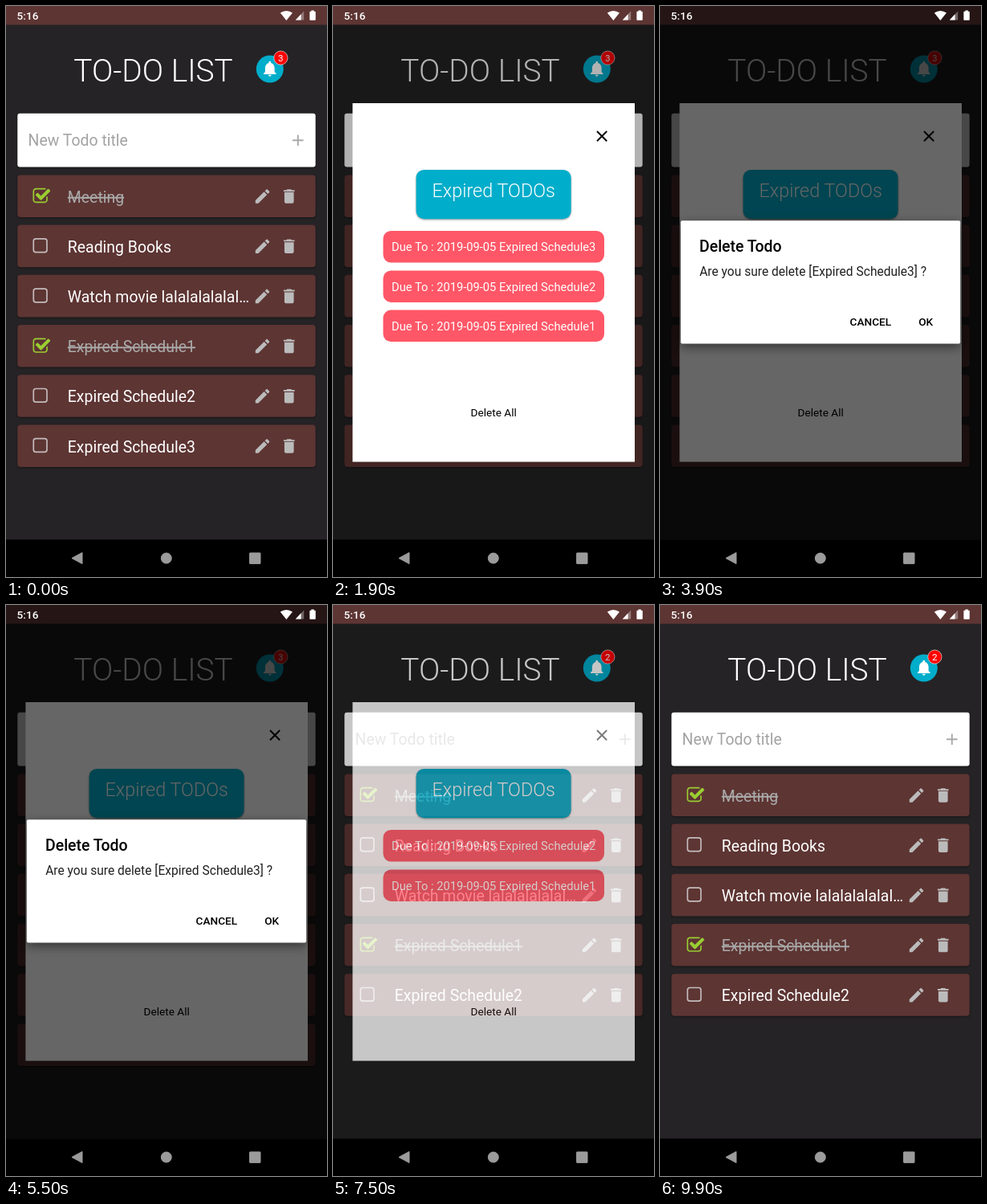
An HTML page for the animation above (10000 ms loop, 400 px wide and 711 px high).

```html
<!DOCTYPE html>
<html lang="en">
<head>
<meta charset="utf-8">
<title>To-do list</title>
<style>
  html, body { margin: 0; width: 100%; height: 100%; overflow: hidden; background: #252325; }
  svg { display: block; width: 100vw; height: 100vh; }
  text { font-family: Roboto, "Noto Sans", sans-serif; white-space: pre; }
  .mid { text-anchor: middle; }
  .light { font-weight: 300; }
  .medium { font-weight: 500; }
  .white { fill: #fff; }
  .item { font-size: 19.46px; fill: #fff; }
  .done { fill: #aaa; text-decoration: line-through; }
  .pill rect { fill: #ff5767; }
  .pill text { font-size: 14.7px; fill: #fff; text-anchor: middle; }
  .card { filter: drop-shadow(0 1.2px 1.2px rgba(0, 0, 0, .4)); }
  .raised { filter: drop-shadow(0 4px 7px rgba(0, 0, 0, .5)); }

  .modal, .alert, .old, .new, .pressed, .close {
    animation: 10s step-end infinite;
  }
  .modal { animation-name: modal; }
  .alert { animation-name: alert; }
  .old { animation-name: old; }
  .new { animation-name: new; }
  .pressed { animation-name: press; }
  .close { animation-name: close; }

  @keyframes modal {
    0% { opacity: 0; }
    15% { opacity: .5; }
    16% { opacity: 1; }
    75% { opacity: .75; }
    76% { opacity: .2; }
    77%, 100% { opacity: 0; }
  }
  @keyframes alert {
    0% { opacity: 0; }
    36% { opacity: .5; }
    37% { opacity: 1; }
    56% { opacity: .5; }
    57%, 100% { opacity: 0; }
  }
  @keyframes old {
    0% { visibility: visible; }
    57%, 100% { visibility: hidden; }
  }
  @keyframes new {
    0% { visibility: hidden; }
    57%, 100% { visibility: visible; }
  }
  @keyframes press {
    0% { opacity: 1; }
    34% { opacity: .7; }
    35% { opacity: .26; }
    36% { opacity: .5; }
    37%, 100% { opacity: 1; }
  }
  @keyframes close {
    0% { opacity: 1; }
    74% { opacity: .7; }
    77%, 100% { opacity: 1; }
  }
</style>
</head>
<body>
<svg viewBox="0 0 400 711" preserveAspectRatio="none">
  <defs>
    <g id="row">
      <rect class="card" x="14.3" width="371.4" height="52.6" rx="4" fill="#5d3533"/>
      <g fill="#bbb">
        <path transform="translate(307.9 14.9) scale(.973)" d="M3 17.25V21h3.75L17.81 9.94l-3.75-3.75L3 17.25zM20.71 7.04c.39-.39.39-1.02 0-1.41l-2.34-2.34c-.39-.39-1.02-.39-1.41 0l-1.83 1.83 3.75 3.75 1.83-1.83z"/>
        <path transform="translate(341.1 14.9) scale(.973)" d="M6 19c0 1.1.9 2 2 2h8c1.1 0 2-.9 2-2V7H6v12zM19 4h-3.5l-1-1h-5l-1 1H5v2h14V4z"/>
      </g>
    </g>
    <rect id="box" x="34.3" y="17.3" width="16.7" height="16.7" rx="2.9" fill="none" stroke="#c4bcbc" stroke-width="1.67"/>
    <path id="tick" transform="translate(33.5 14.8) scale(.01303)" fill="#9acd32" d="M1408 930v318q0 119-84.5 203.5t-203.5 84.5h-832q-119 0-203.5-84.5t-84.5-203.5v-832q0-119 84.5-203.5t203.5-84.5h832q63 0 117 25 15 7 18 23 3 17-9 29l-49 49q-10 10-23 10-3 0-9-2-23-6-45-6h-832q-66 0-113 47t-47 113v832q0 66 47 113t113 47h832q66 0 113-47t47-113v-254q0-13 9-22l64-64q10-10 23-10 6 0 12 3 20 8 20 29zm231-489l-814 814q-24 24-57 24t-57-24l-430-430q-24-24-24-57t24-57l110-110q24-24 57-24t57 24l263 263 647-647q24-24 57-24t57 24l110 110q24 24 24 57t-24 57z"/>
    <rect id="pill" x="62.5" width="275.5" height="39.5" rx="9.7"/>
  </defs>

  <!-- list screen -->
  <rect width="400" height="711" fill="#252325"/>
  <rect width="400" height="23.4" fill="#5d3533"/>
  <text class="light white mid" x="183.5" y="94" font-size="38.9">TO-DO LIST</text>

  <circle cx="328.8" cy="78.5" r="17" fill="#00adca"/>
  <path class="white" transform="translate(317.1 66.4) scale(.973)" d="M12 22c1.1 0 2-.9 2-2h-4c0 1.1.89 2 2 2zm6-6v-5c0-3.07-1.64-5.64-4.5-6.32V4c0-.83-.67-1.5-1.5-1.5s-1.5.67-1.5 1.5v.68C7.63 5.36 6 7.92 6 11v5l-2 2v1h16v-1l-2-2z"/>
  <circle cx="342.4" cy="64.6" r="8.6" fill="#f00" stroke="#fff" stroke-width=".6"/>
  <g class="white mid" font-size="11.7">
    <text class="old" x="342.4" y="68.8">3</text>
    <text class="new" x="342.4" y="68.8">2</text>
  </g>

  <rect class="card" x="14.3" y="133.7" width="371.4" height="66.8" rx="3" fill="#fff"/>
  <text x="27.6" y="174.2" font-size="19.46" fill="#a3a3a3">New Todo title</text>
  <path d="M357 167.2h13.6M363.8 160.4v13.6" stroke="#aaa" stroke-width="1.95"/>

  <g transform="translate(0 210.4)">
    <use href="#row"/><use href="#tick"/>
    <text class="item done" x="76.8" y="34.3">Meeting</text>
  </g>
  <g transform="translate(0 272.6)">
    <use href="#row"/><use href="#box"/>
    <text class="item" x="76.8" y="34.3">Reading Books</text>
  </g>
  <g transform="translate(0 334.8)">
    <use href="#row"/><use href="#box"/>
    <text class="item" x="76.8" y="34.3">Watch movie lalalalalalal…</text>
  </g>
  <g transform="translate(0 397)">
    <use href="#row"/><use href="#tick"/>
    <text class="item done" x="76.8" y="34.3">Expired Schedule1</text>
  </g>
  <g transform="translate(0 459.2)">
    <use href="#row"/><use href="#box"/>
    <text class="item" x="76.8" y="34.3">Expired Schedule2</text>
  </g>
  <g class="old" >
    <g transform="translate(0 521.4)">
      <use href="#row"/><use href="#box"/>
      <text class="item" x="76.8" y="34.3">Expired Schedule3</text>
    </g>
  </g>

  <!-- expired items -->
  <g class="modal">
    <rect y="23.4" width="400" height="641" fill="#000" opacity=".3"/>
    <rect x="24.4" y="121" width="351.6" height="446.6" fill="#fff"/>
    <path class="close" d="M329 156l12.2 12.2M341.2 156L329 168.2" stroke="#000" stroke-width="1.95"/>
    <rect class="card" x="103.6" y="204" width="193" height="61.2" rx="9.7" fill="#00adca"/>
    <text class="light white mid" x="200.2" y="238.3" font-size="23.4">Expired TODOs</text>
    <g class="old">
      <g class="pill pressed">
        <use href="#pill" y="280" fill="#ff5767"/>
        <text x="200.2" y="305.4">Due To : 2019-09-05 Expired Schedule3</text>
      </g>
      <g class="pill">
        <use href="#pill" y="329.4" fill="#ff5767"/>
        <text x="200.2" y="354.7">Due To : 2019-09-05 Expired Schedule2</text>
        <use href="#pill" y="378.6" fill="#ff5767"/>
        <text x="200.2" y="403.9">Due To : 2019-09-05 Expired Schedule1</text>
      </g>
    </g>
    <g class="new pill">
      <use href="#pill" y="280" fill="#ff5767"/>
      <text x="200.2" y="305.4">Due To : 2019-09-05 Expired Schedule2</text>
      <use href="#pill" y="329.4" fill="#ff5767"/>
      <text x="200.2" y="354.7">Due To : 2019-09-05 Expired Schedule1</text>
    </g>
    <text class="mid" x="200.2" y="510.8" font-size="13.62">Delete All</text>
  </g>

  <!-- confirm dialog -->
  <g class="alert">
    <rect width="400" height="664.4" fill="#000" opacity=".6"/>
    <rect class="raised" x="25.8" y="267.2" width="348.4" height="153.2" rx="2" fill="#fff"/>
    <text class="medium" x="49" y="305.6" font-size="19.46">Delete Todo</text>
    <text x="49.2" y="335.8" font-size="15.57" fill="#212121">Are you sure delete [Expired Schedule3] ?</text>
    <g class="medium mid" font-size="13.62">
      <text x="262.4" y="398.3">CANCEL</text>
      <text x="331.2" y="398.3">OK</text>
    </g>
  </g>

  <!-- system bars -->
  <g class="white">
    <text class="medium" x="13.6" y="17" font-size="13.62">5:16</text>
    <path d="M341.8 8.6Q349.4 3.2 357 8.6L349.4 18z"/>
    <path d="M360.8 17.4h10.4V6.6z" opacity=".35"/>
    <path d="M360.8 17.4h6.8v-7.1z"/>
    <path d="M380.4 5.4h3.4v1.4h1.2q.8 0 .8.8v9.4q0 .8-.8.8h-5.8q-.8 0-.8-.8V7.600q0-.8.8-.8h1.200z"/>
  </g>
  <rect y="664.4" width="400" height="46.600" fill="#000"/>
  <g fill="#9b9b9b" stroke="#9b9b9b" stroke-linejoin="round">
    <path d="M82 687.6l13-7v14z"/>
    <circle cx="199.800" cy="687.6" r="6.500"/>
    <rect x="303.600" y="681" width="13.400" height="13.400" rx=".5"/>
  </g>
</svg>
</body>
</html>
```
